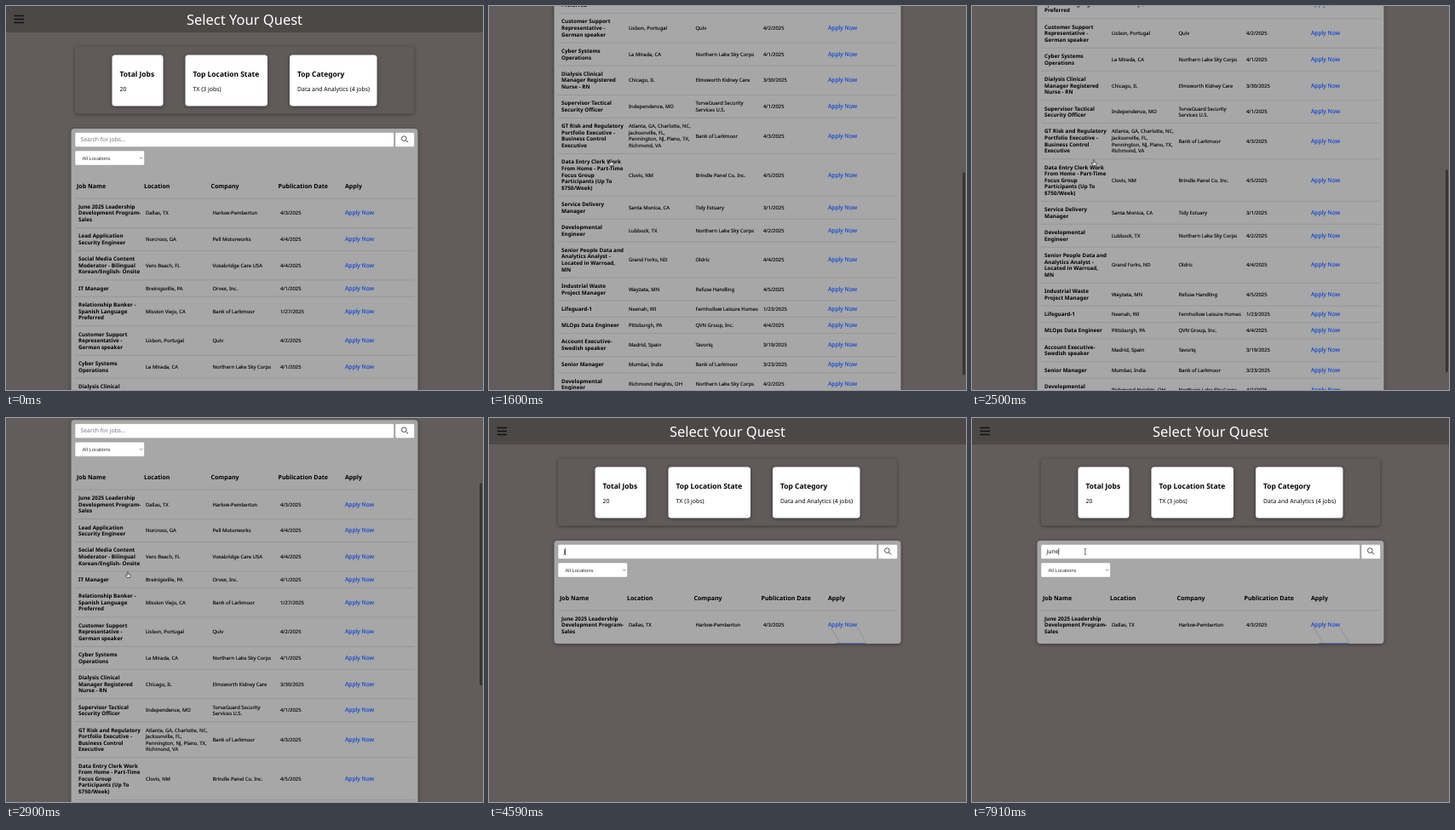
An HTML page for the animation above (8000 ms loop, 560 by 451 pixels).

```html
<!DOCTYPE html>
<html lang="en">
<head>
<meta charset="utf-8">
<title>Job search</title>
<style>
  html, body { margin: 0; width: 100%; height: 100%; overflow: hidden; background: #625d5c; }
  svg { display: block; width: 560px; height: 451px; }
  text { font: 5.9px "Noto Sans", sans-serif; white-space: pre; text-rendering: geometricPrecision; }
  .title { font-size: 16.5px; fill: #fff; text-anchor: middle; }
  .stat { font-size: 8.45px; font-weight: 700; }
  .value { font-size: 6.9px; }
  .head { font-size: 7.05px; font-weight: 700; }
  .name { font-size: 6.3px; font-weight: 700; }
  .cell { stroke: #000; stroke-width: .12px; }
  .link { font-size: 6.75px; fill: #1549d4; stroke: #1549d4; stroke-width: .15px; }
  .input { font-size: 6.8px; }
  .select { font: 5.8px "Liberation Sans", sans-serif; fill: #333; }
  .shadow { filter: drop-shadow(0 1px 2px rgba(0, 0, 0, .4)); }
</style>
</head>
<body>
<svg id="stage" viewBox="0 0 560 451"></svg>
<script>
const LOOP = 8000, TABLE_TOP = 226, LINE = 7.6, ROW_PADDING = 11.7;

// name; location; company; date ("|" breaks a line)
const jobs = `June 2025 Leadership|Development Program-|Sales;Dallas, TX;Harlow-Pemberton;4/3/2025
Lead Application|Security Engineer;Norcross, GA;Pell Motorworks;4/4/2025
Social Media Content|Moderator - Bilingual|Korean/English- Onsite;Vero Beach, FL;Voxabridge Care USA;4/4/2025
IT Manager;Breinigsville, PA;Orvex, Inc.;4/1/2025
Relationship Banker -|Spanish Language|Preferred;Mission Viejo, CA;Bank of Larkmoor;1/27/2025
Customer Support|Representative -|German speaker;Lisbon, Portugal;Quiv;4/2/2025
Cyber Systems|Operations;La Mirada, CA;Northern Lake Sky Corps;4/1/2025
Dialysis Clinical|Manager Registered|Nurse - RN;Chicago, IL;Elmsworth Kidney Care;3/30/2025
Supervisor Tactical|Security Officer;Independence, MO;TorvaGuard Security|Services U.S.;4/1/2025
GT Risk and Regulatory|Portfolio Executive -|Business Control|Executive;Atlanta, GA, Charlotte, NC,|Jacksonville, FL,|Pennington, NJ, Plano, TX,|Richmond, VA;Bank of Larkmoor;4/3/2025
Data Entry Clerk Work|From Home - Part-Time|Focus Group|Participants (Up To|$750/Week);Clovis, NM;Brindle Panel Co. Inc.;4/5/2025
Service Delivery|Manager;Santa Monica, CA;Tidy Estuary;3/1/2025
Developmental|Engineer;Lubbock, TX;Northern Lake Sky Corps;4/2/2025
Senior People Data and|Analytics Analyst -|Located in Warroad,|MN;Grand Forks, ND;Oldric;4/4/2025
Industrial Waste|Project Manager;Wayzata, MN;Refuse Handling;4/5/2025
Lifeguard-1;Neenah, WI;Fernhollow Leisure Homes;1/23/2025
MLOps Data Engineer;Pittsburgh, PA;QVN Group, Inc.;4/4/2025
Account Executive-|Swedish speaker;Madrid, Spain;Tavoriq;3/19/2025
Senior Manager;Mumbai, India;Bank of Larkmoor;3/23/2025
Developmental|Engineer;Richmond Heights, OH;Northern Lake Sky Corps;4/2/2025`
  .split("\n").map(row => row.split(";").map(cell => cell.split("|")));

const text = (x, y, s, cls = "") => `<text x="${x}" y="${y}" class="${cls}">${s}</text>`;
const box = (x, y, w, h, fill, r = 0, more = "") =>
  `<rect x="${x}" y="${y}" width="${w}" height="${h}" rx="${r}" fill="${fill}" ${more}/>`;
const path = (d, stroke, w = 1, more = "") =>
  `<path d="${d}" fill="none" stroke="${stroke}" stroke-width="${w}" ${more}/>`;
const cellText = (x, mid, lines, cls = "cell") => lines.map((s, i) =>
  text(x, mid + 2.2 + (i - (lines.length - 1) / 2) * LINE, s, cls)).join("");
const card = (x, w, title, value) =>
  box(x, 57.5, w, 60, "#fff", 3.5, 'class="shadow"') +
  text(x + 9, 82.8, title, "stat") + text(x + 9, 99.8, value, "value");

let bottom = TABLE_TOP;
const rows = jobs.map(([name, place, company, date]) => {
  const height = ROW_PADDING + LINE * name.length, mid = bottom + height / 2;
  const row = path(`M81 ${bottom}H479.5`, "#939393", .8) +
    cellText(85, mid, name, "name") + cellText(164, mid, place) +
    cellText(242.5, mid, company) + cellText(322, mid, date) +
    cellText(398, mid, ["Apply Now"], "link");
  bottom += height;
  return row;
});
const fullHeight = bottom + 4 - 144, filteredHeight = 121;

const heads = [[83, "Job Name"], [162, "Location"], [240.5, "Company"], [319.5, "Publication Date"], [398, "Apply"]];
const stage = document.getElementById("stage");
stage.innerHTML = `
<g id="page">
  ${box(0, 0, 560, 31, "#4c4847")}
  ${path("M9.5 11.5H21M9.5 15.5H21M9.5 19.5H21", "#111", 1.3)}
  ${text(280, 22, "Select Your Quest", "title")}
  ${box(81, 48, 398, 78.5, "#605b5a", 4, 'class="shadow"')}
  ${card(124.5, 60, "Total Jobs", "20")}
  ${card(210.5, 96.5, "Top Location State", "TX (3 jobs)")}
  ${card(333, 102.5, "Top Category", "Data and Analytics (4 jobs)")}
  ${box(76.5, 144, 407, fullHeight, "#a6a7a6", 4, 'id="panel" class="shadow"')}
  ${box(81, 148.5, 374.5, 17, "#fff", 1.5, 'stroke="#999" stroke-width=".5"')}
  ${box(457, 148.5, 22.5, 17, "#fff", 1.5, 'stroke="#999" stroke-width=".5"')}
  <circle cx="467.3" cy="155.6" r="2.8" fill="none" stroke="#222" stroke-width=".8"/>
  ${path("M469.4 157.7L472 160.3", "#222", 1)}
  ${text(87.5, 159.2, "", "input")}
  ${path("M0 153V161", "#111", .7, 'id="caret"')}
  ${box(81, 170, 81.5, 17, "#fff", 1.5, 'stroke="#999" stroke-width=".5"')}
  ${text(89.5, 180.6, "All Locations", "select")}
  ${path("M157 177.7L158.7 179.4L160.4 177.7", "#555", .7)}
  ${heads.map(([x, s]) => text(x, 213.6, s, "head")).join("")}
  ${rows[0]}
  <g id="rest">${rows.slice(1).join("")}</g>
  <g id="trace">
    ${path("M401 246L412 264M432 246L443 264", "#777b86", .5)}
    ${path("M407 264.8H442", "#2c4fae", .8)}
  </g>
</g>
${box(556, 0, 3, 238, "#393535", 1.5, 'id="thumb"')}
<g id="hand">
  <path d="M-.7 -3.2Q0 -4 .7 -3.2V-.6L2.8 0Q3.4 .3 3.2 1.2L2.5 3.5H-.8L-2.8 .8Q-2.6 -.1 -1.7 .3L-.7 1Z"
    fill="#ddd" stroke="#222" stroke-width=".6"/>
</g>
<g id="beam">${path("M-1.4 -3.4Q0 -3.4 0 -2.6Q0 -3.4 1.4 -3.4M0 -2.6V2.6M-1.4 3.4Q0 3.4 0 2.6Q0 3.4 1.4 3.4", "#333", .7)}</g>`;

const part = Object.fromEntries([...stage.querySelectorAll("[id]")].map(e => [e.id, e]));
const input = stage.querySelector(".input");
const show = (e, on) => e.style.display = on ? "" : "none";

// Piecewise linear value through [time, value] points
function track(points, t) {
  const i = points.findIndex(p => p[0] > t);
  if (i === 0) return points[0][1];
  if (i < 0) return points[points.length - 1][1];
  const [t0, a] = points[i - 1], [t1, b] = points[i];
  return a + (b - a) * (t - t0) / (t1 - t0);
}

const scrollPath = [[1110, 0], [1170, 5.3], [1300, 90], [1450, 275], [1600, 367], [1750, 382], [1900, 386],
  [2000, 386], [2300, 378], [2500, 361.4], [2800, 210], [3000, 75], [3200, 0]];
const cursorX = [[610, 415], [800, 143], [3200, 143], [3370, 145], [6730, 145], [7050, 415], [7150, 415], [7410, 180], [7540, 165], [7900, 133]];
const cursorY = [[610, 425], [800, 184], [3200, 184], [3370, 161], [6730, 161], [7050, 245], [7150, 245], [7410, 182], [7540, 168], [7900, 157]];
const keyTimes = [4590, 4740, 4920, 5960];
const caretToggles = [3740, 4240, 4590, 5420, 5580, 6460, 6960, 7460, 7900];

function draw(now) {
  const t = now % LOOP;
  const scroll = track(scrollPath, t);
  const typed = "june".slice(0, keyTimes.filter(k => k <= t).length);
  const filtered = typed !== "";

  part.page.setAttribute("transform", `translate(0 ${-scroll})`);
  part.panel.setAttribute("height", filtered ? filteredHeight : fullHeight);
  show(part.rest, !filtered);
  show(part.trace, filtered);

  input.textContent = typed || "Search for jobs...";
  input.setAttribute("fill", filtered ? "#111" : "#777");
  const caretX = 87.5 + (filtered ? input.getComputedTextLength() + .3 : 0);
  part.caret.setAttribute("transform", `translate(${caretX} 0)`);
  show(part.caret, caretToggles.filter(c => c <= t).length % 2);

  part.thumb.setAttribute("y", 1 + scroll * .53);
  part.thumb.setAttribute("opacity", track([[1110, 0], [1150, 1], [3200, 1], [3360, 0]], t));

  const x = track(cursorX, t), y = track(cursorY, t);
  const visible = t >= 610 && (t < 4590 || t >= 6730);
  const overField = t >= 3200 && y < 166 || t >= 7540;
  for (const cursor of [part.hand, part.beam]) {
    cursor.setAttribute("transform", `translate(${x} ${y})`);
    show(cursor, visible && overField === (cursor === part.beam));
  }
}

const start = performance.now();
function frame() {
  draw(performance.now() - start);
  requestAnimationFrame(frame);
}
frame();
</script>
</body>
</html>
```
